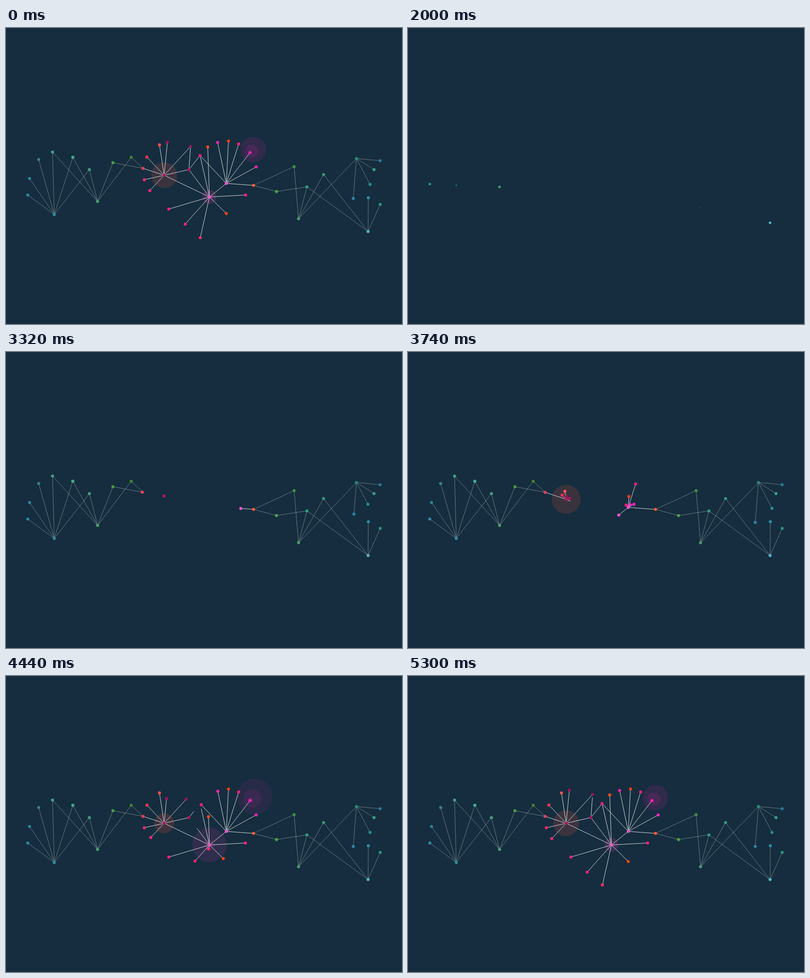
An HTML page with a canvas for the animation above (5320 ms loop, 800 by 600 pixels).

```html
<!DOCTYPE html>
<html lang="en">
<head>
<meta charset="utf-8">
<title>Growing network</title>
<style>
  html, body { margin: 0; width: 100%; height: 100%; overflow: hidden; background: #152d3e; }
  canvas { display: block; }
</style>
</head>
<body>
<canvas id="stage" width="800" height="600"></canvas>
<script>
const ctx = document.getElementById('stage').getContext('2d');
const LOOP = 5320, HOLD_END = 1000, GROW_START = 2000, PULSE_END = 5240;
const nodes = [], edges = [];

// Smooth start with a longer, softer arrival.
const ease = p => 1 - (1 - p) ** 3 * (1 + 3 * p);
const progress = (item, t) => Math.min(1, Math.max(0, (t - item.start) / item.dur));

// A free dot that slides vertically into place.
function drop(x, y, color, dy, start, dur = 400) {
  const node = { x, y, color, dy, start, dur };
  nodes.push(node);
  return node;
}

// A line between two existing nodes.
function link(from, to, start, dur, dot = false) {
  edges.push({ from, to, start, dur, dot, bright: [from, to].every(n => n.x >= 277 && n.x <= 506) });
}

// A new dot that travels out of its parent, pulling a line.
function grow(parent, x, y, color, start, dur) {
  const node = { x, y, color, parent, start, dur };
  nodes.push(node);
  link(parent, node, start, dur);
  return node;
}

// Left cluster
const leftEnd = drop(44, 338.5, '#2a8aa2', -30, 1900);
const leftHub = drop(97.5, 378, '#2a8fa4', -65.5, 1945);
const leftBase = drop(185, 351.5, '#4aa070', -40, 1900);
link(leftHub, leftEnd, 2200, 450);
grow(leftHub, 47.5, 305, '#2a8698', 2180, 1050);
grow(leftHub, 66, 266.5, '#35877f', 2460, 800);
const leftPeak = grow(leftHub, 94, 251.5, '#46a086', 2610, 600);
const leftFork = grow(leftBase, 135, 262, '#3fae8e', 2348, 800);
link(leftHub, leftFork, 2680, 640, true);
const leftMid = grow(leftHub, 168.5, 287, '#45a07c', 2130, 700);
link(leftMid, leftBase, 2577, 600);
link(leftBase, leftPeak, 2550, 700);
const leftArm = grow(leftBase, 216, 273, '#4a9f45', 2760, 420);
const leftTop = grow(leftBase, 253, 262, '#46862f', 2350, 800);
const leftGate = grow(leftArm, 277, 284.5, '#ff3c5a', 3000, 400);
link(leftTop, leftGate, 2950, 450);

// Right cluster
const rightBase = drop(591, 386.5, '#4a9a70', -23, 1975);
const rightHub = drop(731.5, 412.5, '#55b5c8', -24, 1900);
const rightTop = drop(582, 281, '#3c9440', 30, 2480, 500);
const rightMid = grow(rightHub, 608, 322, '#2a9f80', 2100, 650);
const rightArm = grow(rightMid, 546.5, 331.5, '#4aa845', 2690, 450);
const rightPeak = grow(rightBase, 641.5, 297, '#2f9a7a', 2220, 750);
const rightFan = grow(rightBase, 708, 264.5, '#2a8a78', 2178, 727);
link(rightBase, rightMid, 2354, 700);
link(rightHub, rightPeak, 2145, 750);
grow(rightHub, 732, 344, '#2a8fa5', 2256, 900);
grow(rightHub, 756, 357.5, '#2a937a', 2270, 980);
grow(rightFan, 756, 269, '#257a94', 2720, 450);
grow(rightFan, 743.5, 287, '#38a088', 2740, 480);
grow(rightFan, 735.5, 317, '#2a8a9a', 2766, 900);
grow(rightFan, 701.5, 345.5, '#2a86a8', 2774, 950);
link(rightTop, rightBase, 2780, 450);
const rightGate = grow(rightTop, 500, 319, '#ff5a30', 2780, 500);
link(rightGate, rightArm, 3000, 300);

// Centre: left burst
const burst = drop(319.5, 298.5, '#b01068', -20, 3124);
link(leftGate, burst, 3400, 400);
grow(burst, 310, 237, '#ff5050', 3500, 960);
grow(burst, 284.5, 261.5, '#ff3058', 3485, 1100);
grow(burst, 326, 231.5, '#a3125e', 3544, 1650);
grow(burst, 279.5, 307.5, '#f02a6a', 3800, 640);
grow(burst, 290.5, 329.5, '#f5287f', 3943, 690);
const bridge = grow(burst, 369.5, 287, '#b0105f', 3604, 800);
const spur = grow(burst, 373, 240, '#9a1560', 4020, 690);

// Centre: right burst
const crown = grow(rightGate, 445, 315, '#f04fd0', 3100, 600);
const joint = grow(crown, 392, 258.5, '#f51a8a', 3600, 1100);
grow(crown, 427.5, 232, '#f520b8', 3686, 920);
grow(crown, 449.5, 229, '#f03c14', 3567, 700);
grow(crown, 470, 235, '#f51f80', 3520, 500);
const beacon = grow(crown, 493, 252.5, '#ff1fc0', 3626, 850);
grow(crown, 505.5, 281.5, '#f522b8', 3535, 1000);

// Centre: lower burst
const core = grow(crown, 411, 342.5, '#f052cc', 3550, 450);
link(burst, core, 3632, 800);
link(core, joint, 3835, 930);
link(core, bridge, 4125, 700);
link(bridge, joint, 4190, 700);
link(bridge, spur, 4850, 700);
grow(core, 407.5, 241, '#ff4a1a', 4058, 900);
grow(core, 484, 338.5, '#ff1f80', 4050, 440);
grow(core, 445, 376, '#ff3f10', 4050, 650);
grow(core, 362, 397.5, '#ff1f78', 4000, 1000);
grow(core, 392.5, 425, '#ff2c68', 4265, 1250);
grow(core, 329, 367, '#ff1f88', 4030, 400);

// Speeds in pixels per ms; drift shifts a ring in proportion to its radius.
const pulses = [
  { node: burst, color: '#e8503c', start: 3545, period: 380, speed: 0.15, max: 75, inner: 0, drift: [0, 0] },
  { node: core, color: '#d63aa8', start: 4207, period: 470, speed: 0.15, max: 60, inner: 0.3, drift: [0, 0] },
  { node: beacon, color: '#d0209a', start: 3886, period: 477, speed: 0.065, max: 49, inner: 0.52, drift: [0.26, -0.23] }
];

function lerpTo(from, to, v) {
  return { x: from.x + (to.x - from.x) * v, y: from.y + (to.y - from.y) * v };
}

function position(node, t) {
  const v = ease(progress(node, t));
  if (!node.parent) return { x: node.x, y: node.y + node.dy * (1 - v) };
  return lerpTo(position(node.parent, t), node, v);
}

function disc({ x, y }, r, color, alpha = 1) {
  ctx.globalAlpha = alpha;
  ctx.fillStyle = color;
  ctx.beginPath();
  ctx.arc(x, y, r, 0, 2 * Math.PI);
  ctx.fill();
  ctx.globalAlpha = 1;
}

const dotRadius = (item, t) => 3.1 * Math.min(1, (t - item.start) / 120);
const edgeTip = (edge, t) => lerpTo(position(edge.from, t), edge.to, ease(progress(edge, t)));

function drawEdge(edge, t) {
  const a = position(edge.from, t), b = edgeTip(edge, t);
  ctx.strokeStyle = edge.bright ? 'rgba(255,255,255,.8)' : 'rgba(255,255,255,.36)';
  ctx.beginPath();
  ctx.moveTo(a.x, a.y);
  ctx.lineTo(b.x, b.y);
  ctx.stroke();
}

function drawPulse(pulse, t) {
  const { x, y } = position(pulse.node, t);
  for (let start = pulse.start; start < t; start += pulse.period) {
    const r = (t - start) * pulse.speed;
    if (r > pulse.max) continue;
    const alpha = 0.25 * (1 - 0.8 * r / pulse.max);
    for (const size of [r, r * pulse.inner]) {
      const centre = { x: x + size * pulse.drift[0], y: y + size * pulse.drift[1] };
      disc(centre, size, pulse.color, alpha);
    }
  }
}

function draw(time) {
  ctx.fillStyle = '#152d3e';
  ctx.fillRect(0, 0, 800, 600);
  if (time >= HOLD_END && time < GROW_START) return;
  const t = time < HOLD_END ? LOOP + 1000 : time;
  const started = item => item.start < t;
  for (const pulse of pulses) drawPulse(pulse, Math.min(t, PULSE_END));
  ctx.lineWidth = 1;
  for (const edge of edges.filter(started)) {
    drawEdge(edge, t);
    if (edge.dot) disc(edgeTip(edge, t), dotRadius(edge, t), edge.to.color);
  }
  // Parents are listed before their children, so reverse order keeps hubs on top.
  for (const node of nodes.filter(started).reverse()) {
    disc(position(node, t), dotRadius(node, t), node.color);
  }
}

function tick() {
  draw(Math.floor(performance.now() % LOOP / 20) * 20);
  requestAnimationFrame(tick);
}
tick();
</script>
</body>
</html>
```
